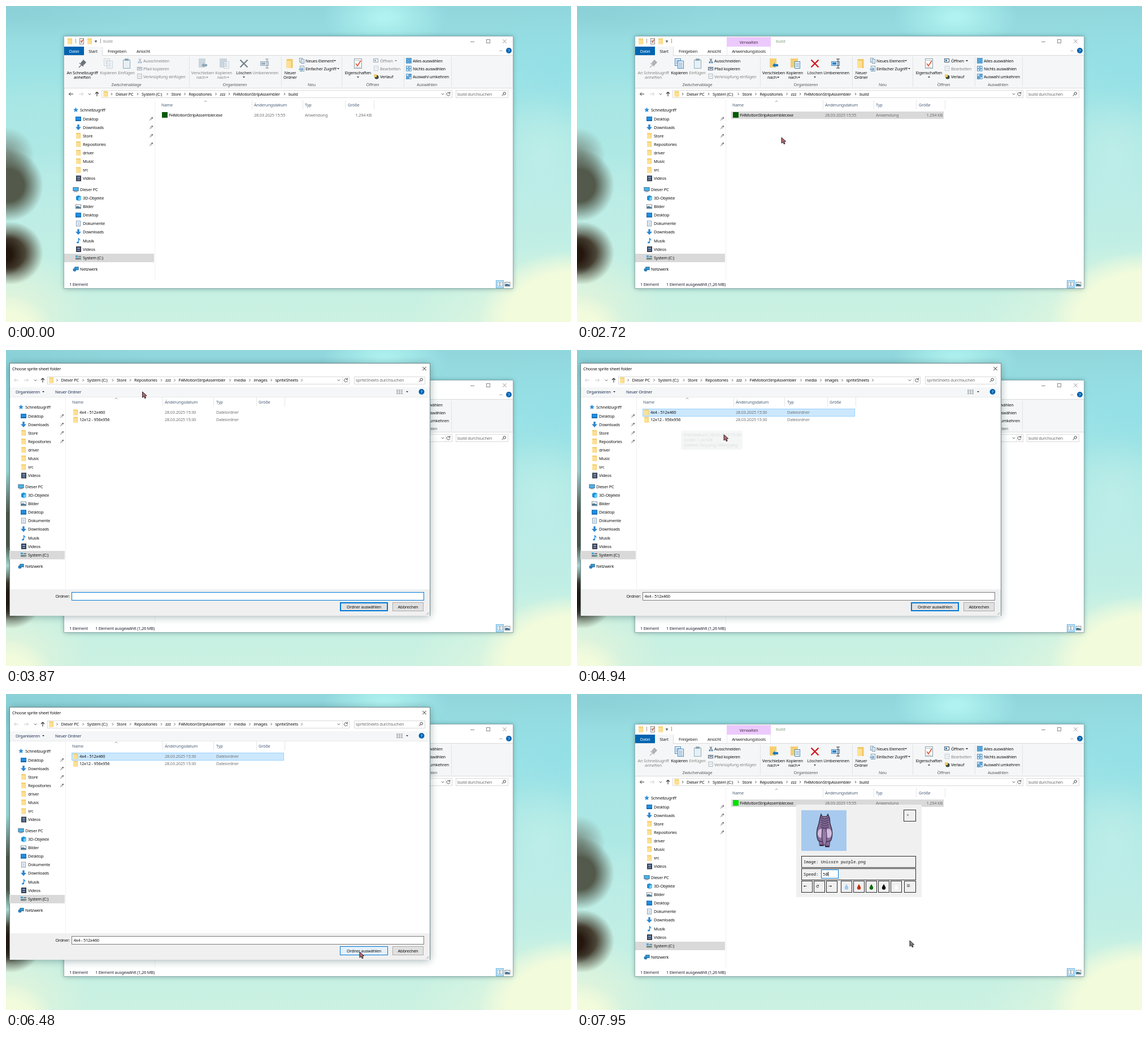
An HTML page with a canvas that plays this animation: 1000x560 px, repeating every 8000 ms.

```html
<!DOCTYPE html>
<html lang="de">
<head>
<meta charset="utf-8">
<style>
html, body { margin: 0; width: 100%; height: 100%; overflow: hidden; }
canvas { display: block; }
</style>
</head>
<body>
<canvas id="stage" width="1000" height="560"></canvas>
<script>
const c = document.getElementById('stage').getContext('2d');
const UI = '7.4px "Noto Sans", "Open Sans", sans-serif';
const MONO = '7.33px "Noto Sans Mono", "DejaVu Sans Mono", monospace';
const APP = 'Fi4MotionStripAssembler';
const LOOP = 8000, GRAY = '#858585', HEAD = '#4c607a', DATE = '#707070';
const clamp = v => Math.max(0, Math.min(1, v));
const ramp = (t, a, b) => clamp((t - a) / (b - a));

function rect(x, y, w, h, fill, stroke) {
  if (fill) { c.fillStyle = fill; c.fillRect(x, y, w, h); }
  if (stroke) { c.strokeStyle = stroke; c.lineWidth = 1; c.strokeRect(x + .5, y + .5, w - 1, h - 1); }
}
function text(s, x, y, color = '#111', align = 'left', font = UI) {
  c.font = font;
  c.letterSpacing = font === UI ? '-0.2px' : '0px';
  c.fillStyle = color;
  c.textAlign = align;
  c.fillText(s, x, y + 2.7);
}
function path(d, x, y, fill, stroke, width = 1) {
  const p = new Path2D(d);
  c.save();
  c.translate(x, y);
  if (fill) { c.fillStyle = fill; c.fill(p); }
  if (stroke) { c.strokeStyle = stroke; c.lineWidth = width; c.stroke(p); }
  c.restore();
}
function oval(x, y, rx, ry, fill, turn = 0) {
  c.fillStyle = fill;
  c.beginPath();
  c.ellipse(x, y, rx, ry, turn, 0, 7);
  c.fill();
}
function faded(alpha, draw) {
  c.save();
  c.globalAlpha *= alpha;
  draw();
  c.restore();
}
function shadowed(x, y, w, h, fill, blur) {
  c.save();
  c.shadowColor = 'rgba(0,40,45,.38)';
  c.shadowBlur = blur;
  c.shadowOffsetY = 1;
  rect(x, y, w, h, fill);
  c.restore();
}
const tri = (x, y, col = '#333') => path('M-2 -1H2L0 1.3Z', x, y, col);
const chevron = (x, y) => path('M-1 -2L1 0L-1 2', x, y, null, '#444', .9);
const down = (x, y) => path('M-2.2 -1L0 1.2L2.2 -1', x, y, null, '#444', .9);
const up = (x, y, col = '#777') => path('M-2.2 1L0 -1.2L2.2 1', x, y, null, col, .8);
const cross = (x, y, r, col, w) => path(`M${-r} ${-r}L${r} ${r}M${r} ${-r}L${-r} ${r}`, x, y, null, col, w);
const arrow = (x, y, dir, col) => path(`M${4 * dir} 0H${-3.5 * dir}M${-.5 * dir} -3L${-3.5 * dir} 0L${-.5 * dir} 3`, x, y, null, col, 1);
const upArrow = (x, y) => path('M0 4V-3.5M-3 -.5L0 -3.5L3 -.5', x, y, null, '#333', 1.1);
const magnifier = (x, y) => path('M-3.5 3.5L-.5 .5M3.5 -1A2.3 2.3 0 1 1 -1.1 -1A2.3 2.3 0 1 1 3.5 -1', x, y, null, '#333', .9);
const refresh = (x, y) => path('M2.6 -1.4A3 3 0 1 0 3 .6M2.8 -4V-1.2H0', x, y, null, '#444', .9);
function help(x, y) {
  oval(x, y, 5, 5, '#0063b1');
  text('?', x, y, '#fff', 'center');
}
function sheet(x, y, w, h, edge = '#7d9cb5') {
  rect(x, y, w, h, '#fff', edge);
  for (let i = 3; i < h - 2; i += 2) rect(x + 2, y + i, w - 4, .7, edge);
}

const icons = {
  folder(x, y) {
    rect(x - 4, y - 5, 8, 10, '#f3cd68');
    rect(x - 4, y - 3, 7, 8, '#fde094');
  },
  star: (x, y) => path('M0 -4.5L1.2 -1.5 4.4 -1.3 2 .8 2.8 4 0 2.3 -2.8 4 -2 .8 -4.4 -1.3 -1.2 -1.5Z', x, y, '#2b8ad4'),
  screen(x, y) {
    rect(x - 5, y - 4, 10, 8, '#1f8fe5', '#1669ad');
    rect(x - 4, y + 2, 8, 1, '#1669ad');
  },
  load: (x, y) => path('M-1.7 -5H1.7V-.5H5L0 5L-5 -.5H-1.7Z', x, y, '#2d86cf'),
  film(x, y) {
    rect(x - 4, y - 5, 9, 10, '#3b3f47');
    rect(x - 2, y - 3, 5, 6, '#6f8fc0');
    rect(x - 2, y, 5, 1, '#2a2c30');
  },
  pc(x, y) {
    rect(x - 5, y - 4, 10, 7, '#49b1ee', '#58778c');
    rect(x - 3, y + 3.5, 6, 1, '#58778c');
  },
  cube(x, y) {
    path('M-4 -3L0 -5 5 -3V3L1 5 -4 3Z', x, y, '#1c8fd8');
    path('M0 -1L5 -3V3L0 5Z', x, y, '#6ccaf5');
  },
  image(x, y) {
    rect(x - 5, y - 4, 10, 8, '#fff', '#7d8c98');
    path('M-4 3V0L-1 -1 4 1V3Z', x, y, '#4a7891');
  },
  doc: (x, y) => sheet(x - 4, y - 5, 8, 10),
  note(x, y) {
    path('M.5 -5V3M.5 -5Q1 -2 3.5 -1', x, y, null, '#1c86d8', 1.3);
    oval(x - 1, y + 3, 2, 1.6, '#1c86d8');
  },
  drive(x, y) {
    rect(x - 5, y, 10, 3.5, '#7b848b');
    rect(x - 5, y - 4, 4, 3, '#35a5e0');
    rect(x, y - 3, 5, 1.5, '#667');
    rect(x + 2, y + 1.5, 2, 1, '#5f5');
  },
  net(x, y) {
    rect(x - 2, y - 4, 7, 6, '#2f9be0', '#45738f');
    oval(x - 2, y + 1.5, 3, 3, '#2f7fb8');
  }
};

function blob(x, y, rx, ry, color, core = 0) {
  c.save();
  c.translate(x, y);
  c.scale(rx, ry);
  const g = c.createRadialGradient(0, 0, core, 0, 0, 1);
  g.addColorStop(0, color);
  g.addColorStop(1, color.slice(0, 7) + '00');
  c.fillStyle = g;
  c.fillRect(-1, -1, 2, 2);
  c.restore();
}
function backdrop() {
  const g = c.createLinearGradient(0, 0, 0, 560);
  ['#90d6dc', '#9ce2e5', '#ace8e5', '#bbece6', '#c3efe4', '#cbf1e2'].forEach((col, i) => g.addColorStop(i / 5, col));
  rect(0, 0, 1000, 560, g);
  blob(0, 10, 260, 50, '#87cdd3aa');
  blob(670, 20, 110, 60, '#b0f2f0', .1);
  blob(1000, 110, 200, 110, '#8fdfe8aa');
  blob(950, 260, 90, 110, '#c5f0ea99');
  blob(60, 210, 120, 90, '#abe7e4');
  blob(1000, 570, 290, 150, '#e3f7de', .2);
  blob(1000, 560, 165, 125, '#f2fbdc', .7);
  blob(0, 540, 150, 110, '#dff4dc', .2);
  blob(0, 575, 85, 65, '#f2fbdc', .5);
  blob(0, 265, 50, 50, '#6b7568aa', .2);
  blob(4, 318, 62, 64, '#535a4b', .45);
  blob(8, 438, 58, 56, '#4b4637', .45);
  blob(0, 440, 34, 38, '#23160d', .3);
}

const NAV = [
  [184, 'star', 'Schnellzugriff'], [200, 'screen', 'Desktop'], [215, 'load', 'Downloads'],
  [230, 'folder', 'Store'], [245, 'folder', 'Repositories'], [260, 'folder', 'driver'],
  [275, 'folder', 'Music'], [290.5, 'folder', 'src'], [305.5, 'film', 'Videos'],
  [325, 'pc', 'Dieser PC'], [340.5, 'cube', '3D-Objekte'], [355.5, 'image', 'Bilder'],
  [370.5, 'screen', 'Desktop'], [385.5, 'doc', 'Dokumente'], [400.5, 'load', 'Downloads'],
  [416, 'note', 'Musik'], [431, 'film', 'Videos'], [446, 'drive', 'System (C:)'], [466, 'net', 'Netzwerk']
];
function navPane(dx, dy, width, pinX) {
  c.save();
  c.translate(dx, dy);
  rect(103, 439, width, 15, '#d9d9d9');
  NAV.forEach(([y, icon, label], i) => {
    const root = ['star', 'pc', 'net'].includes(icon);
    icons[icon](root ? 123.5 : 128, y);
    text(label, root ? 131 : 136, y);
    if (i > 0 && i < 5) path('M-3 3L-.5 .5M-2 -1L1 2M0 -1.5L2 -3L3 -2L1.5 0Z', pinX, y, '#777', '#777', .9);
  });
  c.restore();
}
function crumbs(x, y, tail) {
  const names = ['Dieser PC', 'System (C:)', 'Store', 'Repositories', 'zzz', APP, ...tail];
  const offsets = [0, 46, 98.5, 129.5, 184.5, 208, 306, 341, 379];
  icons.folder(x - 17.5, y);
  names.forEach((name, i) => {
    chevron(x + offsets[i] - 7, y);
    text(name, x + offsets[i], y);
  });
}
function columns(y, xs, seps) {
  ['Name', 'Änderungsdatum', 'Typ', 'Größe'].forEach((s, i) => text(s, xs[i], y, HEAD));
  seps.forEach(x => rect(x, y - 8, 1, 16, '#e5e5e5'));
}

function ribbonIcons(on) {
  const dim = on ? 1 : .5, blue = on ? '#3f83bd' : '#93a9b8';
  const pages = (x, y) => { sheet(x - 8, y - 9, 11, 13, blue); sheet(x - 3, y - 5, 11, 14, blue); };
  const tall = (x, y) => { rect(x - 5.5, y - 8, 11, 16, '#f0c765'); rect(x - 5.5, y - 5, 8, 13, '#fde094'); };
  faded(on ? .45 : 1, () => path('M-6 7L-1 2M-5 -1L2 5M-2 -1L2 -6L6 -2L1 3Z', 135, 102, '#6a737b', '#6a737b', 1.5));
  faded(dim, () => pages(181, 102));
  faded(.75, () => {
    rect(207, 95, 13, 16, '#e2eef5', '#6e97ad');
    rect(210, 93, 7, 4, '#7f97a3');
    sheet(232.5, 120, 8, 9, '#8a9ba6');
  });
  const tray = on ? '#f5cf70' : '#cbd6de';
  rect(341, 93, 12, 16, tray);
  path('M-3 -3L-7 1 -3 5V3H3V-1H-3Z', 353, 104, on ? '#1c78c4' : '#8fa7b7');
  rect(378, 93, 13, 16, tray);
  faded(dim, () => sheet(385, 98, 10, 13, blue));
  cross(421, 102, 6.5, on ? '#d3171c' : '#76838b', 2.4);
  rect(450, 98, 15, 8, on ? '#d6e9f7' : '#e4eaee', blue);
  rect(452, 100, 7, 4, on ? '#2d83c7' : '#9fb3c0');
  path('M-3 -8H3M0 -8V8M-3 8H3', 462, 102, null, on ? '#333' : '#81909b', 1);
  tall(502, 102);
  sheet(616, 93, 14, 18, '#8b9ba6');
  rect(618, 97, 10, 10, '#fff');
  path('M-4 0L-1 4L5 -5', 623, 102, null, '#d9532c', 1.6);

  faded(dim, () => {
    path('M-2 -4L2 2M2 -4L-2 2', 237, 97, null, '#455', 1);
    oval(235, 100, 1.6, 1.6, '#3f83bd'); oval(239, 100, 1.6, 1.6, '#3f83bd');
    rect(232, 108, 9, 6, '#d6e3ec', '#567');
    rect(234, 110, 5, 1, '#345');
    rect(650, 93, 9, 7, '#fff', '#456');
    rect(652, 95, 3, 3, '#2d83c7');
  });
  sheet(519, 92, 6, 8); sheet(522, 94, 6, 8);
  sheet(520, 106, 8, 10); arrow(522, 112, -1, '#2d83c7');
  faded(.5, () => sheet(651, 106, 8, 9));
  oval(656, 126, 3.6, 3.6, '#3a4a3a');
  rect(651, 121, 5, 5, '#f3cd68');
  for (let k = 0; k < 3; k++) for (let i = 0; i < 4; i++) {
    const lit = k === 0 || (k === 2 && i % 3 > 0);
    rect(708 + i % 2 * 5, 92 + k * 14 + (i >> 1) * 5, 4.6, 4.6, lit ? '#58aee8' : '#e8f2f9', '#4d94c8');
  }
}
function ribbon(on) {
  const live = on ? '#111' : GRAY;
  rect(104, 87, 793, 58, '#f5f6f7');
  rect(103, 87, 794, 1, '#dadbdc');
  rect(103, 145, 794, 1, '#dadbdc');
  rect(138, 72, 33, 16, '#f5f6f7');
  rect(170, 72, 1, 16, '#dadbdc');
  rect(103, 72, 35, 15, '#0063b1');
  text('Datei', 120.5, 80, '#fff', 'center');
  [['Start', 154], ['Freigeben', 196.5], ['Ansicht', 243]].forEach(([s, x]) => text(s, x, 80, '#222', 'center'));
  if (on) {
    rect(265, 55, 78, 17, '#ecc9fd');
    rect(265, 72, 1, 15, '#eee3f3'); rect(342, 72, 1, 15, '#eee3f3');
    text('Verwalten', 304, 64, '#4a3452', 'center');
    text('Anwendungstools', 304, 80, '#222', 'center');
  }
  [324, 487, 594, 704, 788].forEach(x => rect(x, 90, 1, 53, '#e2e3e4'));
  ribbonIcons(on);
  const pin = on ? GRAY : '#111';
  [['An Schnellzugriff', 135, 118, pin], ['anheften', 135, 126.5, pin], ['Kopieren', 181, 118, live],
   ['Einfügen', 213, 118, GRAY], ['Verschieben', 348, 118, live], ['nach', 345, 126.5, live],
   ['Kopieren', 385, 118, live], ['nach', 382, 126.5, live], ['Löschen', 421, 118, '#222'],
   ['Umbenennen', 459, 118, live], ['Neuer', 503, 118], ['Ordner', 503, 126.5], ['Eigenschaften', 623, 118]
  ].forEach(([s, x, y, col]) => text(s, x, y, col, 'center'));
  [['Ausschneiden', 243, 97, live], ['Pfad kopieren', 243, 111, live], ['Verknüpfung einfügen', 243, 125, GRAY],
   ['Neues Element', 530, 97], ['Einfacher Zugriff', 530, 111], ['Öffnen', 662, 97, live],
   ['Bearbeiten', 662, 111, GRAY], ['Verlauf', 662, 125], ['Alles auswählen', 720, 97],
   ['Nichts auswählen', 720, 111], ['Auswahl umkehren', 720, 125]
  ].forEach(a => text(...a));
  tri(356, 126.5, live); tri(393, 126.5, live); tri(690, 97, live);
  [[421, 126], [623, 126], [582, 97], [588, 111]].forEach(([x, y]) => tri(x, y));
  [['Zwischenablage', 213], ['Organisieren', 405], ['Neu', 541], ['Öffnen', 649], ['Auswählen', 745]]
    .forEach(([s, x]) => text(s, x, 139, '#5a5a5a', 'center'));
}

function explorer(t) {
  const on = t >= 2400, selected = t >= 2150;
  shadowed(103, 53, 794, 447, '#fff', 8);
  rect(102, 53, 796, 448, null, '#8fb0b2');
  icons.folder(113, 62.5);
  rect(123, 58, 1, 8, '#999');
  sheet(130, 57, 8, 11, '#8a8a8a');
  path('M-2 0L0 2L3 -3', 134, 62, null, '#d9532c', 1.2);
  icons.folder(148, 62.5);
  tri(159, 63.5); rect(157, 61, 4, .8, '#333');
  rect(167, 58, 1, 8, '#999');
  text('build', on ? 352 : 172, 62.5, on ? '#82a382' : '#8a8a8a');
  rect(822, 63, 7, 1, '#888');
  rect(850, 59, 7, 7, null, '#888');
  cross(882.5, 62.5, 3.2, '#888', .9);
  up(876, 79.5);
  ribbon(on);
  help(890, 79);

  arrow(115, 156, 1, '#333'); arrow(133, 156, -1, '#ccc'); down(148, 156); upArrow(161, 156);
  rect(169, 149, 621, 14, null, '#d9d9d9');
  crumbs(194, 156, []);
  chevron(493, 156); text('build', 500, 156);
  down(773, 156); rect(778, 150, 1, 12, '#e5e5e5'); refresh(783, 156);
  rect(796, 149, 93, 14, null, '#d9d9d9');
  text('build durchsuchen', 799, 156, '#6d6d6d');
  magnifier(881, 156);

  navPane(0, 0, 159, 257);
  rect(263, 166, 1, 319, '#f0f0f0');
  columns(175, [275, 439, 529, 605], [435, 525, 600, 651]);
  up(353, 169);
  const hover = t >= 1060 && t < 2450;
  const fill = selected ? (t < 2600 ? '#cce8ff' : '#d9d9d9') : hover ? '#e5f3ff' : null;
  if (fill) rect(273, 187, 376, 13, fill);
  rect(276, 188, 10, 10, t >= 6620 ? '#00e000' : '#065a08');
  text(APP + '.exe', 288, 193.5);
  text('28.03.2025 15:55', 439, 193.5, DATE);
  text('Anwendung', 529, 193.5, DATE);
  text('1.294 KB', 647, 193.5, DATE, 'right');

  text('1 Element', 112, 493, '#223');
  if (selected) text('1 Element ausgewählt (1,26 MB)', 158, 493, '#223');
  rect(867, 486, 14, 14, '#cde8f8', '#5fb4e6');
  sheet(869, 489, 5, 8, '#9ab4c4'); sheet(874, 489, 5, 8, '#9ab4c4');
  icons.image(887.5, 493);
}

function dialog(t) {
  shadowed(6, 24, 744, 447, '#fff', 14);
  rect(6, 23, 745, 448, null, '#6f8486');
  text('Choose sprite sheet folder', 11, 33);
  cross(740.5, 33, 3.2, '#222', 1);
  arrow(18, 53.5, 1, '#ccc'); arrow(36, 53.5, -1, '#ccc'); down(52, 53.5); upArrow(65, 53.5);
  rect(73, 47, 535, 14, null, '#d9d9d9');
  crumbs(97.5, 53.5, ['media', 'images', 'spriteSheets']);
  if (t >= 3120) chevron(523.5, 53.5);
  down(589, 53.5); rect(595, 48, 1, 12, '#e5e5e5'); refresh(601.5, 53.5);
  rect(616, 47, 126, 14, null, '#d9d9d9');
  text('spriteSheets durchsuchen', 619, 53.5, '#6d6d6d');
  magnifier(734, 53.5);

  rect(7, 66, 743, 18, '#f5f6f7');
  rect(7, 83, 743, 1, '#e8e9ea');
  text('Organisieren', 17, 74, '#1e3257'); tri(66, 74);
  text('Neuer Ordner', 87, 74, '#1e3257');
  for (let i = 0; i < 9; i++) rect(691 + i % 3 * 4, 70.5 + (i / 3 | 0) * 3, 3, 1.5, '#8796a0');
  tri(710, 74);
  help(735.5, 74);

  navPane(-97, -83, 98, 196);
  rect(105, 84, 1, 340, '#f0f0f0');
  columns(92, [117, 281, 372, 447], [277, 367, 443, 493]);
  up(195, 86);
  const picked = t >= 4200;
  if (picked) rect(116, 104, 376, 14, '#cce8ff', '#99d1ff');
  else if (t >= 3960) rect(116, 104, 376, 14, '#e5f3ff');
  [['4x4 - 512x460', 110.5], ['12x12 - 956x956', 123.5]].forEach(([s, y]) => {
    icons.folder(123, y);
    text(s, 130, y);
    text('28.03.2025 15:30', 281, y, DATE);
    text('Dateiordner', 372, y, DATE);
  });

  rect(7, 424, 743, 47, '#f0f0f0');
  text('Ordner:', 113, 436.5, '#111', 'right');
  const shade = 122 - 99 * ramp(t, 5450, 5600) * (1 - ramp(t, 5850, 6070));
  rect(116, 429, 624, 15, '#fff', picked ? `rgb(${shade},${shade},${shade})` : '#0078d7');
  if (picked) text('4x4 - 512x460', 119.5, 436.5);
  else if (t < 3450) rect(119, 432, 1, 9, '#111');
  const over = t >= 5700;
  rect(591, 447, 85, 16, over ? '#e5f1fb' : '#e1e1e1', '#0078d7');
  if (!over) rect(592, 448, 83, 14, null, '#0078d7');
  text('Ordner auswählen', 633.5, 455, '#111', 'center');
  rect(684, 447, 55, 16, '#e1e1e1', '#adadad');
  text('Abbrechen', 711.5, 455, '#111', 'center');
  path('M-4 0L0 -4M-2 0L0 -2', 748, 469, null, '#999', .8);

  const tip = ramp(t, 4400, 4540) * (1 - ramp(t, 4760, 4970));
  if (tip > 0) faded(tip, () => {
    shadowed(185, 143, 107, 32, '#fff', 3);
    rect(185, 143, 107, 32, null, '#c8c8c8');
    ['Erstelldatum: 28.03.2025 15:30', 'Größe: 1,40 MB', 'Dateien: Guy.png, Viking.png']
      .forEach((s, i) => text(s, 189, 150 + i * 9.3, '#575757'));
  });
}

const PALE = '#d3bcdb', LILAC = '#b497c2', MAUVE = '#866b98', PLUM = '#503f61', INK = '#2a2033';
function sideView(step) {
  const swing = Math.sin(step * Math.PI / 2 + .6) * 3;
  const leg = (x, s, fill) => {
    path(`M-5 -2L5 -2L${2 + s} 9L${2 - s * .4} 19H${-3 - s * .4}L${-2 + s} 9Z`, x, 52, fill, PLUM, 1);
    rect(x - 3 - s * .4, 68, 6, 3, INK);
  };
  leg(28, -swing, PLUM);
  leg(53, swing, PLUM);
  path('M56 39Q63 35 67 39T79 38Q77 46 70 45L65 49 56 46Z', 0, 0, MAUVE, PLUM, 1.2);
  path('M20 41Q28 34 40 38Q53 33 60 40Q64 49 58 57L50 54Q40 60 30 57L22 57Q17 50 20 41Z', 0, 0, LILAC, PLUM, 1.2);
  path('M23 53Q40 60 56 52L57 56Q40 61 24 57Z', 0, 0, MAUVE);
  oval(53, 43, 5.5, 5.5, PALE);
  oval(37, 42, 8, 2.6, PALE);
  leg(22, swing, LILAC);
  leg(57, -swing, LILAC);
  path('M13 24L25 18Q33 27 36 43L24 51Q17 45 19 36Z', 0, 0, LILAC, PLUM, .8);
  path('M13 20L5 33Q6 39 11 37L21 32 23 20Z', 0, 0, PALE, PLUM, 1);
  path('M14 20L16 13L20 19Z', 0, 0, LILAC, PLUM, .8);
  path('M18 15Q28 14 31 22L35 26 34 31 39 37 32 40Q27 34 26 29L20 24Z', 0, 0, MAUVE, PLUM, 1.2);
  path('M22 19Q29 24 29 30L34 37M27 19L32 28', 0, 0, null, PLUM, 1.2);
  path('M4 16L12 24L9 27Z', 0, 0, '#d09a32', '#7c561c', .8);
  rect(13, 25, 2.5, 2.5, INK);
  rect(7, 35, 2, 1.5, PLUM);
}
function endView(step, front) {
  const lift = [0, 2, 0, -2][step];
  path('M-5 0L5 0 4 15H-3Z', 35.5, 49 + lift / 2, MAUVE, PLUM, 1);
  path('M-5 0L5 0 3 15H-4Z', 46.5, 49 - lift / 2, MAUVE, PLUM, 1);
  rect(32.5, 62 + lift / 2, 7, 2, INK); rect(42.5, 62 - lift / 2, 7, 2, INK);
  path('M33 14L35 7 37 11H45L47 7 50 14 51 24 54 34Q56 46 52 54L41 57 30 54Q26 46 28 34L31 24Z', 0, 0, MAUVE, INK, 1.2);
  if (front) {
    path('M29 35Q41 46 53 35V50Q41 57 30 50Z', 0, 0, LILAC);
    path('M35 14H48L46 35Q41 40 37 35Z', 0, 0, PALE, PLUM, 1);
    path('M39.5 20L41.5 4L43.5 20Z', 0, 0, '#d09a32', '#7c561c', .8);
    rect(36, 22, 2, 2, INK); rect(45, 22, 2, 2, INK);
    rect(39, 34, 1.5, 1.5, PLUM); rect(43, 34, 1.5, 1.5, PLUM);
  } else {
    for (let y = 13; y < 31; y += 4) path('M0 0L7 3L14 0', 34.5, y, null, PLUM, 1.4);
    oval(35, 41, 6, 8, PALE); oval(48, 41, 6, 8, PALE);
    path('M38 32H45L46 48 44 62 40 62 37 48Z', lift / 2, 0, MAUVE, PLUM, 1.2);
    path('M41 34V58M44 38L43 60', lift / 2, 0, null, LILAC, 1);
  }
}
function sprite(t) {
  const i = Math.max(0, Math.min(15, Math.floor((t - 6480) / 80)));
  const row = i >> 2, step = i % 4;
  c.save();
  c.translate(397, 206);
  rect(0, 0, 80, 72, '#a8caee');
  c.beginPath(); c.rect(0, 0, 80, 72); c.clip();
  if (row === 2) { c.translate(80, 0); c.scale(-1, 1); }
  if (row === 1 || row === 2) sideView(step);
  else endView(step, row === 0);
  c.restore();
}
function viewer(t) {
  rect(388, 196, 222, 164, '#f0f0f0');
  sprite(t);
  const box = (x, y, w, h) => rect(x, y, w, h, null, '#2b2b2b');
  const mono = (s, x, y) => text(s, x, y, '#111', 'left', MONO);
  box(578, 205, 22, 21); cross(585.5, 214.5, 1.3, '#333', .8);
  box(397, 287, 203, 21); mono('Image: Unicorn purple.png', 401, 297);
  box(397, 309, 203, 21); mono('Speed:', 401, 319);
  rect(432, 311, 31, 16, '#fff', '#0078d7');
  mono('50', 435, 319);
  if (t < 7120 || t >= 7650) rect(444, 315, 1, 8, '#111');
  [397, 419, 441, 467, 489, 511, 533, 555, 579].forEach(x => box(x, 331, x === 579 ? 21 : 20, 21));
  path('M5 0H0M1.5 -1.5L0 0L1.5 1.5', 401.5, 340.5, null, '#222', .8);
  path('M3.5 -1.5A2 2 0 1 0 4 .5M4 -3V-1H2', 423.5, 341, null, '#222', .8);
  path('M0 0H5M3.5 -1.5L5 0L3.5 1.5', 445.5, 340.5, null, '#222', .8);
  ['#a3c8ec', '#c23112', '#0b6a14', '#080808', '#ffffff'].forEach((col, i) =>
    path('M0 -4.5Q3.4 .6 3.2 2A3.2 3.2 0 0 1 -3.2 2Q-3.4 .6 0 -4.5Z', 477 + i * 22, 341.5, col));
  rect(584, 337, 5, 5, '#fff', '#888');
  path('M0 -1.5V1.5M-1 .5L0 1.5L1 .5', 586.5, 339.5, null, '#222', .7);
}

const TRAIL = [
  [520, 860, 499], [1120, 362, 191], [2320, 362, 191], [2700, 362, 233], [3390, 362, 233],
  [3800, 254, 66], [3870, 241.5, 74], [4000, 184, 111], [4600, 184, 111], [4940, 260, 150],
  [5000, 260, 150], [5750, 626, 457], [7949, 626, 457], [7950, 589, 437], [8000, 589, 437]
];
function pointer(t) {
  if (t < 520) return;
  const i = TRAIL.findIndex(k => k[0] > t);
  const [t0, x0, y0] = TRAIL[i - 1], [t1, x1, y1] = TRAIL[i];
  const p = ramp(t, t0, t1), e = p * p * (3 - 2 * p);
  path('M0 0V10.2L2.5 8L4.3 11.8L6.2 10.9L4.4 7.3L7.6 7Z',
    x0 + (x1 - x0) * e, y0 + (y1 - y0) * e, t >= 7950 ? '#808080' : '#b56a70', '#2b2024', 1);
}

function draw() {
  const t = performance.now() % LOOP;
  backdrop();
  explorer(t);
  const shown = ramp(t, 2740, 2920) * (1 - ramp(t, 6490, 6620));
  if (shown > 0) faded(shown, () => {
    const k = .92 + .08 * shown;
    c.translate(378, 247);
    c.scale(k, k);
    c.translate(-378, -247);
    dialog(t);
  });
  if (t >= 6620) viewer(t);
  pointer(t);
  requestAnimationFrame(draw);
}
draw();
</script>
</body>
</html>
```
